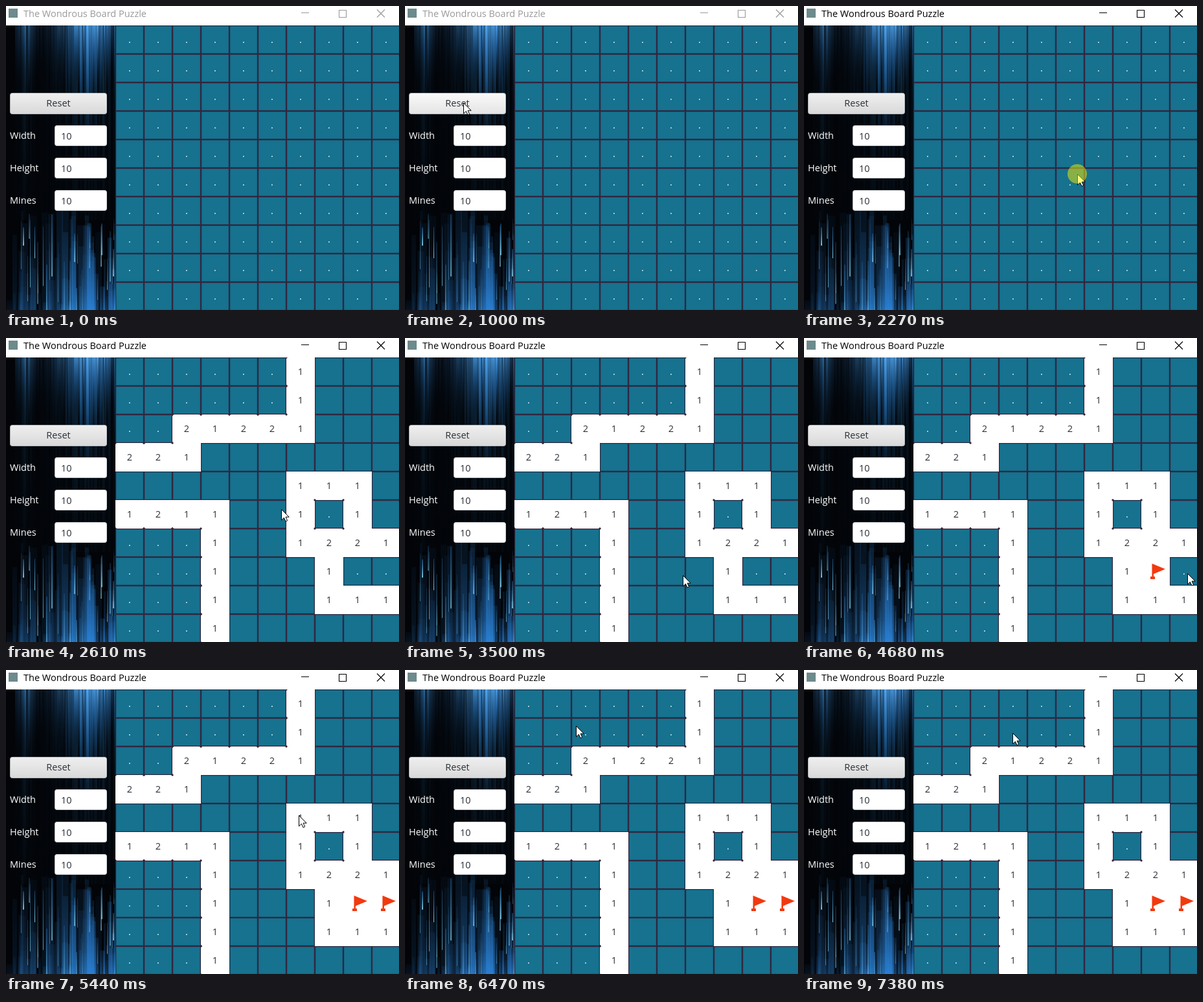
An HTML page that plays this animation: 607 by 469 pixels, repeating every 8000 ms.

```html
<!DOCTYPE html>
<html lang="en">
<head>
<meta charset="utf-8">
<title>Board puzzle</title>
<style>
html, body { margin: 0; width: 100%; height: 100%; overflow: hidden; background: #fff; }
svg { display: block; width: 607px; height: 469px; font: 14.5px "Open Sans", "Noto Sans", sans-serif; }
</style>
</head>
<body>
<svg viewBox="0 0 607 469">
  <defs>
    <linearGradient id="rain" x2="0" y2="1">
      <stop stop-color="#55b0ff"/>
      <stop offset=".35" stop-color="#2a78c4" stop-opacity=".75"/>
      <stop offset="1" stop-color="#0c2c48" stop-opacity="0"/>
    </linearGradient>
    <linearGradient id="haze" x2="0" y2="1">
      <stop stop-color="#18507c"/>
      <stop offset="1" stop-color="#0a2636" stop-opacity=".3"/>
    </linearGradient>
    <linearGradient id="tower" x2="0" y2="1">
      <stop stop-color="#1a5288" stop-opacity=".6"/>
      <stop offset="1" stop-color="#2a80d4"/>
    </linearGradient>
    <linearGradient id="spark" x2="0" y2="1">
      <stop stop-color="#3a94e0" stop-opacity=".4"/>
      <stop offset="1" stop-color="#8ee6ff"/>
    </linearGradient>
    <linearGradient id="button" x2="0" y2="1">
      <stop stop-color="#efefef"/><stop offset="1" stop-color="#d9d9d9"/>
    </linearGradient>
    <linearGradient id="buttonHover" x2="0" y2="1">
      <stop stop-color="#fafafa"/><stop offset="1" stop-color="#e4e4e4"/>
    </linearGradient>
    <clipPath id="side"><rect y="30" width="169" height="439"/></clipPath>
    <clipPath id="field"><rect x="169" y="30" width="440" height="440"/></clipPath>
  </defs>
  <rect width="607" height="469" fill="#fff"/>
  <rect x="4" y="4" width="14" height="14" fill="#6d8a8c"/>
  <text id="caption" x="27" y="17">The Wondrous Board Puzzle</text>
  <path id="controls" fill="none" stroke-width="1.1"
    d="M456 10.5h12M514.5 6.5h11v11h-11zM573 5.5l12 12m0 -12l-12 12"/>
  <g id="panel" clip-path="url(#side)"><rect y="30" width="169" height="439" fill="#020408"/></g>
  <g id="form"></g>
  <g id="fresh" clip-path="url(#field)"></g>
  <g id="opened" clip-path="url(#field)"></g>
  <g id="flags"></g>
  <path id="cursor" d="M.5 .5V17L4.4 13.3L7 19L9.6 17.8L7.1 12.2H12.2Z" fill="#fff" stroke="#000"/>
  <circle id="click" r="15" fill="#f8f000" fill-opacity=".5"/>
</svg>
<script>
const $ = id => document.getElementById(id);
const LOOP = 8000, STEP = 70, CELL = 44, LEFT = 169, TOP = 30, BOTTOM = 469;
const TEAL = "#16728f", LINE = "#30273f", INK = "#2a2f36";

// Moments of the story, ms
const APPEAR = 100, ACTIVATE = 1730, REVEAL = 2340, FLAG_A = 4400, FLAG_B = 4950;

function add(parent, tag, attrs, text) {
  const el = document.createElementNS("http://www.w3.org/2000/svg", tag);
  for (const k in attrs) el.setAttribute(k, attrs[k]);
  if (text !== undefined) el.textContent = text;
  parent.appendChild(el);
  return el;
}

const box = (parent, x, y, width, height, fill, more) =>
  add(parent, "rect", { x, y, width, height, fill, ...more });

function seeded(s) {
  return () => (s = (s * 16807) % 2147483647) / 2147483647;
}

// Streaks fall from the top and towers rise from the bottom, brightest on the right
function drawPanel() {
  const g = $("panel"), rnd = seeded(4177);
  const bump = (x, mid, width) => Math.exp(-(((x - mid) / width) ** 2));
  const glow = x => 0.06 + 0.85 * bump(x, 128, 42) + 0.5 * bump(x, 29, 11);
  for (let x = 14; x < LEFT;) {
    const w = 1 + Math.floor(rnd() * 3), light = glow(x);
    box(g, x, TOP, w, 300, "url(#haze)", { opacity: light * rnd() * 0.75 });
    box(g, x, TOP, w, 70 + light * rnd() * 170, "url(#rain)", { opacity: light * (0.2 + 0.9 * rnd()) });
    x += w;
  }
  for (let i = 0; i < 90; i++) {
    const x = Math.floor(LEFT * rnd() ** 0.65), h = 8 + 160 * rnd() ** 1.5;
    box(g, x, BOTTOM - h, 3 + Math.floor(rnd() * 9), h, "url(#tower)", { opacity: 0.12 + 0.45 * rnd() * x / LEFT });
  }
  for (let i = 0; i < 32; i++) {
    const x = Math.floor(LEFT * rnd() ** 0.55), y = 320 + rnd() * 120;
    box(g, x, y, 1 + Math.floor(rnd() * 2), 25 + rnd() * 80, "url(#spark)", { opacity: 0.25 + 0.65 * rnd() });
  }
}

function drawForm() {
  const g = $("form");
  const reset = box(g, 6.5, 134.5, 149, 32, "url(#button)", { rx: 3, stroke: "#b4b8ba" });
  add(g, "text", { x: 81, y: 155, "text-anchor": "middle", fill: INK }, "Reset");
  ["Width", "Height", "Mines"].forEach((name, i) => {
    const y = 184 + i * 50;
    add(g, "text", { x: 6, y: y + 21, fill: "#fff" }, name);
    box(g, 75.5, y + .5, 80, 31, "#fff", { rx: 3, stroke: "#c8cacc" });
    add(g, "text", { x: 85, y: y + 22, fill: INK }, "10");
  });
  return reset;
}

function drawFlag(x, y) {
  const g = add($("flags"), "g", { transform: `translate(${x} ${y})` });
  box(g, 0, 0, CELL, CELL, "#fff");
  add(g, "path", { d: "M16.5 10L37 18.5L19 26V30H21V34H14V30H16.5Z", fill: "#f2390f" });
  return g;
}

// "." is covered, "f" is covered and flagged later, a blank has no mines around it
function drawBoard(g, rows) {
  const nicks = [], flags = [];
  box(g, LEFT, TOP, 440, 440, LINE);
  rows.forEach((row, r) => [...row].forEach((ch, c) => {
    const x = LEFT + c * CELL, y = TOP + r * CELL, open = ch > "0" && ch < "9";
    if (open) box(g, x, y, CELL, CELL, "#fff");
    else box(g, x + 1.2, y + 1.2, CELL - 2.4, CELL - 2.4, TEAL);
    if (ch === ".") nicks.push([x, y], [x + CELL, y], [x, y + CELL], [x + CELL, y + CELL]);
    if (ch === "f") flags.push(drawFlag(x, y));
    if (ch !== " ") add(g, "text", {
      x: x + 22, y: y + 27, "text-anchor": "middle", fill: open ? INK : "#fff"
    }, open ? ch : ".");
  }));
  for (const [x, y] of nicks) add(g, "path", { d: `M${x - 2} ${y}l2 -2l2 2l-2 2z`, fill: LINE });
  return flags;
}

drawPanel();
const reset = drawForm();
drawBoard($("fresh"), Array(10).fill(".".repeat(10)));
const [flagA, flagB] = drawBoard($("opened"), [
  "......1   ",
  "......1   ",
  "..21221   ",
  "221       ",
  "      111 ",
  "1211  1.1 ",
  "...1  1221",
  "...1   1ff",
  "...1   111",
  "...1      "
]);

// Pointer moves: start, end, points passed on the way
const moves = [
  [APPEAR, 860, [374, 365], [90, 140]],
  [930, 1000, [90, 149]],
  [ACTIVATE, 2270, [422, 259]],
  [2410, 3300, [472, 336]],
  [3370, 3440, [429, 366]],
  [3510, 4070, [470, 403], [564, 388], [546, 352]],
  [FLAG_A, 4680, [592, 363]],
  [FLAG_B, 5440, [452, 224]],
  [5770, 6540, [585, 337], [380, 4], [187, 50], [272, 90]],
  [6610, 7380, [354, 111], [275, 31], [322, 97]]
];

const ease = k => k * k * (3 - 2 * k);

function along(points, k) {
  const f = k * (points.length - 1), i = Math.min(Math.floor(f), points.length - 2);
  return [0, 1].map(d => Math.round(points[i][d] + (points[i + 1][d] - points[i][d]) * (f - i)));
}

function pointer(t) {
  let at = moves[0][2];
  for (const [start, end, ...points] of moves) {
    if (t < start) break;
    const held = Math.floor((t - start) / STEP) * STEP;
    at = along([at, ...points], t >= end ? 1 : ease(held / (end - start)));
  }
  return at;
}

const show = (el, on) => el.setAttribute("visibility", on ? "visible" : "hidden");

function draw(t) {
  const [x, y] = pointer(t), ink = t >= ACTIVATE ? "#000" : "#999";
  $("caption").setAttribute("fill", ink);
  $("controls").setAttribute("stroke", ink);
  const hover = t >= APPEAR && x >= 6 && x <= 156 && y >= 134 && y <= 167;
  reset.setAttribute("fill", hover ? "url(#buttonHover)" : "url(#button)");
  show($("fresh"), t < REVEAL);
  show($("opened"), t >= REVEAL);
  show(flagA, t >= FLAG_A);
  show(flagB, t >= FLAG_B);
  show($("cursor"), t >= APPEAR);
  $("cursor").setAttribute("transform", `translate(${x} ${y})`);
  const ring = $("click");
  show(ring, [ACTIVATE, REVEAL, FLAG_A, FLAG_B].some(m => Math.abs(t - m) < STEP + 1));
  ring.setAttribute("cx", x);
  ring.setAttribute("cy", y);
}

function tick() {
  draw(performance.now() % LOOP);
  requestAnimationFrame(tick);
}
tick();
</script>
</body>
</html>
```
